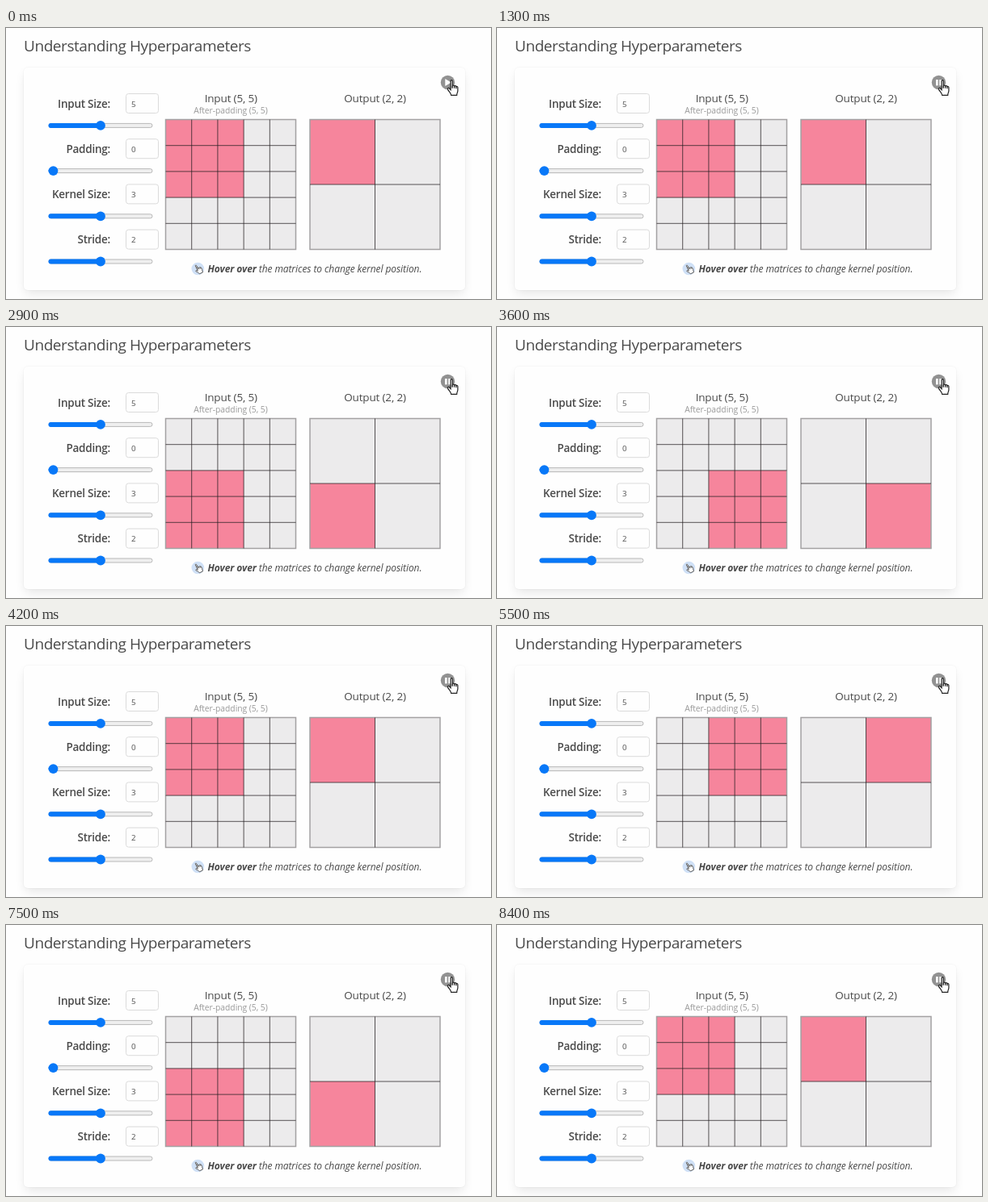
Animation, 600 px wide and 336 px high, one loop 8.5 s. Source, as an HTML page with a canvas:

```html
<!DOCTYPE html>
<html lang="en">
<head>
<meta charset="utf-8">
<title>Understanding Hyperparameters</title>
<style>
html, body { margin: 0; width: 100%; height: 100%; overflow: hidden; background: #fefefe; }
canvas, svg { position: absolute; left: 0; top: 0; width: 600px; height: 336px; }
.card {
  position: absolute; left: 22px; top: 49px; width: 545.5px; height: 275.5px;
  border-radius: 5px; background: #fefefe;
  box-shadow: 0 6px 13px -2px rgba(10, 10, 10, .1), 0 0 0 1px rgba(10, 10, 10, .02);
}
text { font-family: "Open Sans", "Noto Sans", sans-serif; fill: #4a4a4a; }
.title { font-size: 19px; letter-spacing: -.43px; }
.label { font-size: 13.5px; font-weight: 600; letter-spacing: -.24px; text-anchor: end; }
.value { font-size: 9.8px; fill: #505050; }
.head { font-size: 13.5px; letter-spacing: -.15px; text-anchor: middle; }
.sub { font-size: 10.3px; letter-spacing: -.02px; text-anchor: middle; fill: #999; }
.hint { font-size: 12px; font-style: italic; letter-spacing: -.06px; }
.hint tspan { font-weight: 700; }
</style>
</head>
<body>
<div class="card"></div>
<canvas width="600" height="336"></canvas>
<svg viewBox="0 0 600 336">
  <text class="title" x="22" y="29">Understanding Hyperparameters</text>
  <text class="label" x="129" y="99">Input Size:</text>
  <text class="label" x="129" y="155">Padding:</text>
  <text class="label" x="129" y="211">Kernel Size:</text>
  <text class="label" x="129" y="267">Stride:</text>
  <text class="value" x="155" y="98">5</text>
  <text class="value" x="155" y="154">0</text>
  <text class="value" x="155" y="210">3</text>
  <text class="value" x="155" y="266">2</text>
  <text class="head" x="278.3" y="92">Input (5, 5)</text>
  <text class="sub" x="278" y="106">After-padding (5, 5)</text>
  <text class="head" x="456.5" y="92">Output (2, 2)</text>
  <text class="hint" x="249.5" y="303"><tspan>Hover over</tspan> the matrices to change kernel position.</text>
</svg>
<script>
const LOOP = 8500, PLAY_AT = 900;
// Times at which the kernel moves one step in reading order.
const STEPS = [2100, 2800, 3300, 4000, 5500, 6500, 7600, 8000];
const PINK = '#f6859c', CELL = '#ecebec', BLUE = '#0878f8';
const canvas = document.querySelector('canvas');
const ctx = canvas.getContext('2d');
const ratio = window.devicePixelRatio || 1;
canvas.width = 600 * ratio;
canvas.height = 336 * ratio;

function pill(x, y, w, h, r, fill, stroke) {
  ctx.beginPath();
  ctx.roundRect(x, y, w, h, r);
  ctx.fillStyle = fill;
  ctx.fill();
  if (stroke) { ctx.strokeStyle = stroke; ctx.lineWidth = 1; ctx.stroke(); }
}

function disc(x, y, r, fill) {
  ctx.beginPath();
  ctx.arc(x, y, r, 0, 7);
  ctx.fillStyle = fill;
  ctx.fill();
}

function control(y, knob) {
  pill(148.5, y - 12, 40, 24, 3, '#fefefe', '#dbdbdb');
  const track = y + 27.4;
  pill(53, track - 2.5, 128, 5, 2.5, '#efefef', '#b8b8b8');
  pill(52.5, track - 3, knob - 52.5, 6, 3, BLUE);
  disc(knob, track, 5.9, BLUE);
}

function matrix(x, y, n, col, row, span) {
  const size = 161, cell = size / n;
  ctx.fillStyle = CELL;
  ctx.fillRect(x, y, size, size);
  ctx.fillStyle = PINK;
  ctx.fillRect(x + col * cell, y + row * cell, span * cell, span * cell);
  ctx.strokeStyle = '#a3a1a2';
  ctx.lineWidth = 1.5;
  ctx.strokeRect(x, y, size, size);
  ctx.strokeStyle = 'rgba(35,30,32,.75)';
  ctx.lineWidth = 1;
  ctx.beginPath();
  for (let i = 1; i < n; i++) {
    const d = i * cell;
    ctx.moveTo(x + d, y); ctx.lineTo(x + d, y + size);
    ctx.moveTo(x, y + d); ctx.lineTo(x + size, y + d);
  }
  ctx.stroke();
}

const HAND = new Path2D('M4 1.2C4 -.4 6.2 -.4 6.2 1.2V7C6.6 6 8.3 6.2 8.5 7.4C9 6.6 10.6 6.9 10.8 8' +
  'C11.5 7.4 12.8 7.8 12.8 9V13C12.8 15 11.6 16 11.6 18.6H4.6C4.4 16.2 2 14.4 .4 11.4C-.3 10 1.4 9 2.5 10.3L4 12Z');
const FINGERS = new Path2D('M6.2 7V10M8.5 7.4V10M10.8 8V10.5');

// Centred on (x, y).
function hand(x, y, scale, turn, line, width) {
  ctx.save();
  ctx.translate(x, y);
  ctx.rotate(turn);
  ctx.scale(scale, scale);
  ctx.translate(-6.5, -9.3);
  ctx.fillStyle = '#fff';
  ctx.strokeStyle = line;
  ctx.lineWidth = width;
  ctx.fill(HAND);
  ctx.stroke(HAND);
  ctx.stroke(FINGERS);
  ctx.restore();
}

function button(playing) {
  disc(546.5, 67.5, 8.7, '#929292');
  ctx.fillStyle = '#fff';
  if (playing) {
    ctx.fillRect(543, 64, 2.6, 7.4);
    ctx.fillRect(547.3, 64, 2.6, 7.4);
  } else {
    ctx.beginPath();
    ctx.moveTo(543.3, 63);
    ctx.lineTo(550.8, 67.5);
    ctx.lineTo(543.3, 72);
    ctx.fill();
  }
}

function draw(t) {
  const pos = STEPS.filter(s => t >= s).length % 4;
  const col = pos % 2, row = pos >> 1;
  ctx.setTransform(ratio, 0, 0, ratio, 0, 0);
  ctx.clearRect(0, 0, 600, 336);
  [117, 58.5, 117, 117].forEach((knob, i) => control(93.5 + i * 56.2, knob));
  matrix(197.5, 113.5, 5, col * 2, row * 2, 3);
  matrix(376, 113.5, 2, col, row, 1);
  disc(237.3, 298.5, 7.8, '#cfe0f6');
  hand(238, 299, .63, -.45, '#555', 1.4);
  button(t >= PLAY_AT);
  hand(552.6, 74, 1, 0, '#222', 1.2);
}

const start = performance.now();
function tick() {
  draw((performance.now() - start) % LOOP);
  requestAnimationFrame(tick);
}
tick();
</script>
</body>
</html>
```
